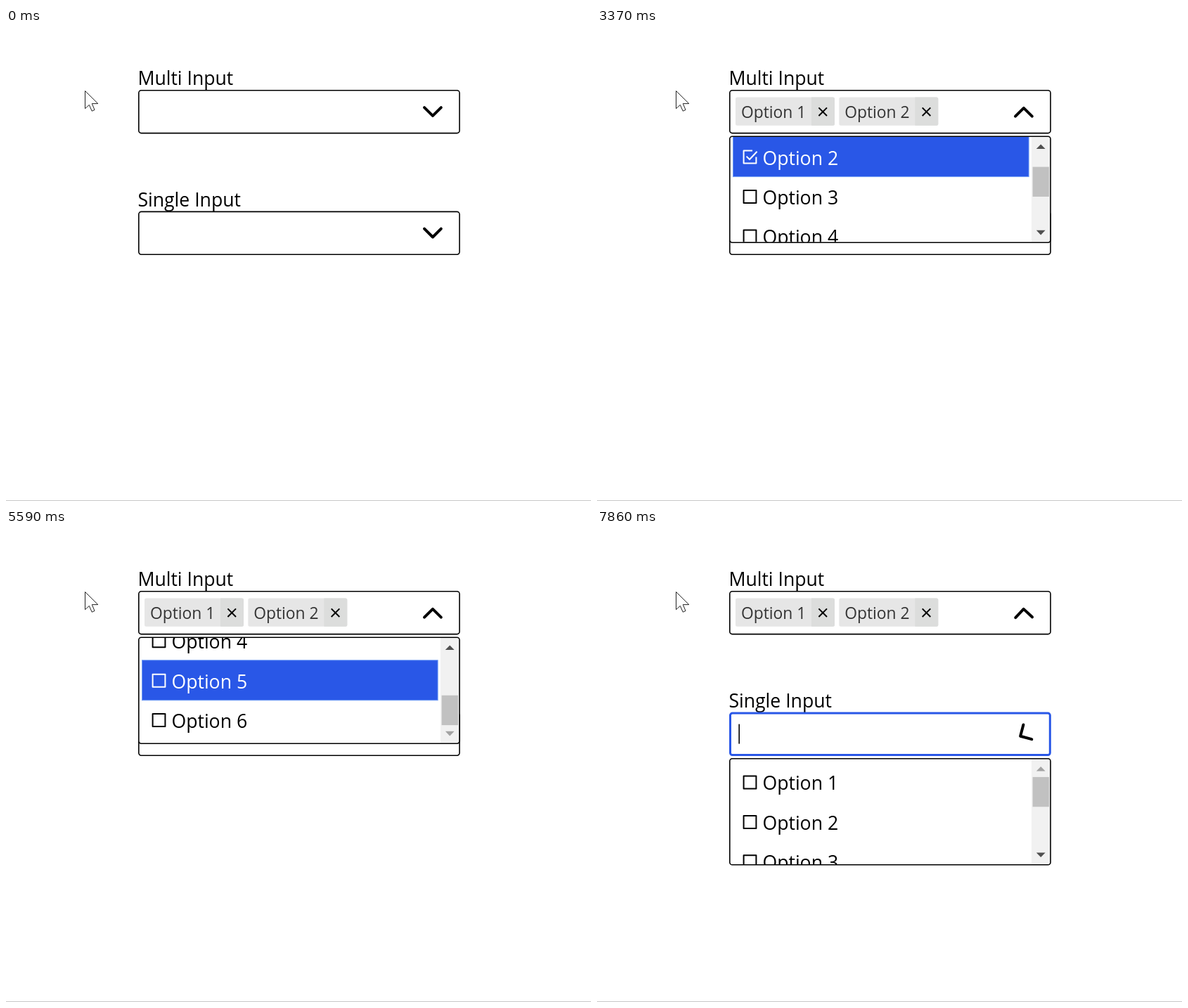
An HTML page that plays this animation: 832 by 673 pixels, repeating every 8000 ms.

```html
<!DOCTYPE html>
<html lang="en">
<head>
<meta charset="utf-8">
<title>Select inputs</title>
<style>
  html, body { margin: 0; width: 100%; height: 100%; overflow: hidden; background: #fff; }
  svg { display: block; width: 832px; height: 673px; }
  text { font-family: "Open Sans", "Noto Sans", sans-serif; font-size: 26.6px; fill: #000; }
  .tag { font-size: 22.8px; fill: #333; }
</style>
</head>
<body>
<svg id="stage" viewBox="0 0 832 673">
  <defs><clipPath id="inside"><rect x="189.6" y="155" width="454.6" height="149.4" rx="3"/></clipPath></defs>
  <g id="scene"></g>
  <path d="M0 672.5H832" stroke="#c8c8c8"/>
  <path d="M112.5 89.5V114.7L118.3 109.4L122.2 118.2L126 116.5L122.3 107.6H130.8Z" fill="#fff" stroke="#222"/>
</svg>
<script>
const LOOP = 8000;
const ROW = 56.4;
const MAX_SCROLL = 197.8;
const FIELD_GAP = 172.6;
const BLUE = '#2957e7';
const scene = document.getElementById('scene');

// Each step changes only the listed parts of the state.
const steps = [
  [0, { open: '', edit: '', caret: false, angle: 0, angle2: 0, focus: 0, picked: 0, scroll: 0 }],
  [480, { open: 'multi', edit: 'multi', caret: true, angle: 29 }],
  [660, { angle: 177 }],
  [840, { angle: 180 }],
  [1000, { caret: false }],
  [1470, { caret: true }],
  [2110, { edit: '', caret: false, focus: 1 }],
  [2740, { picked: 1 }],
  [3060, { focus: 2 }],
  [3370, { picked: 2 }],
  [4960, { focus: 1 }],
  [5420, { focus: 6 }],
  [5590, { focus: 5 }],
  [6060, { focus: 4 }],
  [6230, { focus: 3 }],
  [6560, { focus: 2 }],
  [7860, { open: 'single', edit: 'single', caret: true, focus: 0, angle: 178, angle2: 60 }]
];

const stateAt = t => Object.assign({}, ...steps.filter(s => s[0] <= t).map(s => s[1]));

const rect = (x, y, w, h, rest) => `<rect x="${x}" y="${y}" width="${w}" height="${h}" ${rest}/>`;
const shift = (x, y, body) => `<g transform="translate(${x} ${y})">${body}</g>`;

function tag(n) {
  return shift((n - 1) * 147.3, 0,
    rect(197, 98.5, 141, 40.2, 'rx="2.5" fill="#e6e6e6"') +
    '<path d="M305 98.5H335.5Q338 98.5 338 101V136.2Q338 138.7 335.5 138.7H305Z" fill="#dcdddc"/>' +
    `<text class="tag" x="205" y="128">Option ${n}</text>` +
    '<path d="M315.4 113.4L327 125M327 113.4L315.4 125" stroke="#000" stroke-width="2"/>');
}

function field(label, editing, caret, angle, tags) {
  const border = editing
    ? rect(189.5, 89.5, 454.8, 59.4, `rx="3" fill="#fff" stroke="${BLUE}" stroke-width="3"`)
    : rect(188.8, 88.8, 456.2, 60.8, 'rx="3.6" fill="#fff" stroke="#000" stroke-width="1.6"');
  let out = `<text x="187.4" y="81">${label}</text>` + border;
  for (let n = 1; n <= tags; n++) out += tag(n);
  if (editing && caret) out += rect(201.4, 105, 1.6, 28, 'fill="#000"');
  return out + '<path d="M595 113.1L606.9 124.9L618.8 113.1" fill="none" stroke="#000" ' +
    'stroke-width="4" stroke-linecap="round" stroke-linejoin="round" ' +
    `transform="rotate(${angle} 606.9 119.4)"/>`;
}

function option(n, focused, checked) {
  const ink = focused ? '#fff' : '#000';
  const icon = checked
    ? 'M221 174.6H208.6V192.6H226.4V183.5M212.6 182.6L217 187L227.6 175.8'
    : 'M208.6 174.6H226.4V192.6H208.6Z';
  return shift(0, ((n - 1) * ROW).toFixed(1),
    (focused ? rect(193.5, 154.6, 420.6, 57, `fill="${BLUE}" stroke="#6f9cf5"`) : '') +
    `<path d="${icon}" fill="none" stroke="${ink}" stroke-width="2" stroke-linejoin="round"/>` +
    `<text x="235.5" y="194.5" style="fill:${ink}">Option ${n}</text>`);
}

function list(focus, picked) {
  const scroll = focus ? Math.min(4.3 + (focus - 1) * ROW, MAX_SCROLL) : 0;
  const arrow = live => live ? '#505050' : '#a3a3a3';
  let rows = '';
  for (let n = 1; n <= 6; n++) rows += option(n, n === focus, n <= picked);
  return rect(188.8, 154.2, 456.2, 151, 'rx="3.6" fill="#fff"') +
    '<g clip-path="url(#inside)">' + shift(0, (4.3 - scroll).toFixed(1), rows) +
    rect(618, 155, 26.4, 150, 'fill="#f1f1f1"') +
    rect(619.6, (180.3 + scroll * 0.285).toFixed(1), 23.4, 42.4, 'fill="#c1c1c1"') +
    `<path d="M624.8 172L631.2 165.4L637.6 172Z" fill="${arrow(scroll > 0)}"/>` +
    `<path d="M624.8 287.8L631.2 294.4L637.6 287.8Z" fill="${arrow(scroll < MAX_SCROLL)}"/></g>` +
    rect(188.8, 154.2, 456.2, 151, 'rx="3.6" fill="none" stroke="#000" stroke-width="1.6"');
}

function draw(s) {
  const menu = list(s.focus, s.open === 'single' ? 0 : s.picked);
  return field('Multi Input', s.edit === 'multi', s.caret, s.angle, s.picked) +
    shift(0, FIELD_GAP, field('Single Input', s.edit === 'single', s.caret, s.angle2, 0)) +
    (s.open ? shift(0, s.open === 'single' ? FIELD_GAP : 0, menu) : '');
}

let shown = '';
function render(now) {
  const markup = draw(stateAt(now % LOOP));
  if (markup !== shown) scene.innerHTML = shown = markup;
}

const start = performance.now();
function tick() {
  render(performance.now() - start);
  requestAnimationFrame(tick);
}
tick();
</script>
</body>
</html>
```
